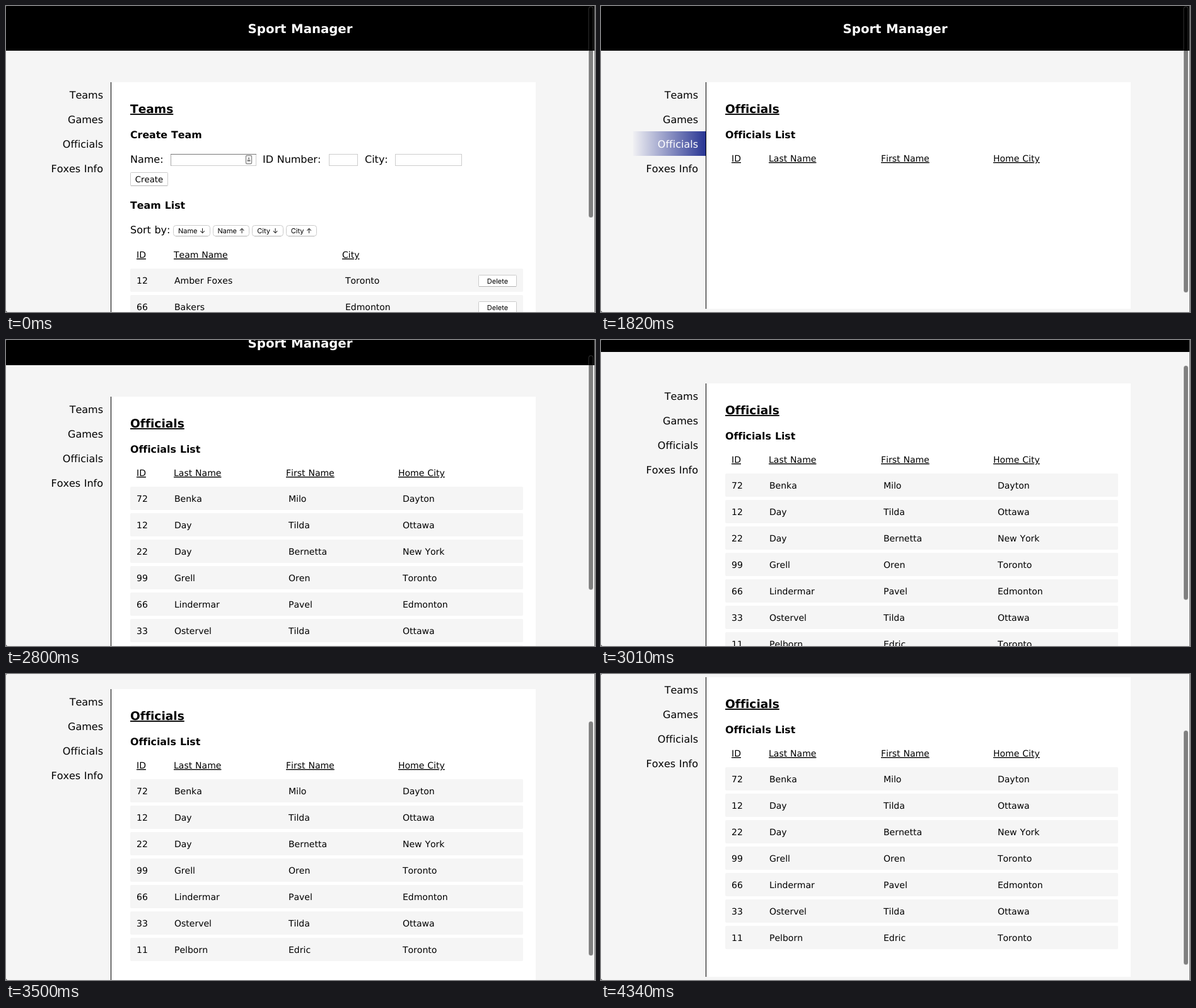
Recreate the animation shown at these times as an HTML page. Size 934 px wide and 486 px high, loop 4410 ms.

```html
<!DOCTYPE html>
<html lang="en">
<head>
<meta charset="utf-8">
<title>Sport Manager</title>
<style>
  html, body { margin: 0; width: 100%; height: 100%; overflow: hidden; background: #f5f5f5; }
  svg { display: block; }
  text {
    font: 16px "DejaVu Sans", Verdana, sans-serif;
    font-kerning: none;
    font-variant-ligatures: none;
    word-spacing: .034em;
    white-space: pre;
    text-rendering: geometricPrecision;
  }
  .title { font-size: 19.7px; font-weight: bold; fill: #fff; text-anchor: middle; }
  .nav { text-anchor: end; }
  .h1 { font-size: 18.6px; font-weight: bold; }
  .h2 { font-size: 15.8px; font-weight: bold; }
  .cell, .head { font-size: 14px; }
  .h1, .head { text-decoration: underline; text-decoration-skip-ink: none; }
  .submit { font-size: 13.3px; text-anchor: middle; }
  .small { font: 11px Inter, Roboto, sans-serif; text-anchor: middle; }
</style>
</head>
<body>
<svg id="stage" width="934" height="486" viewBox="0 0 934 486">
  <defs>
    <linearGradient id="glow">
      <stop offset="0" stop-color="#f0f0f3"/>
      <stop offset="1" stop-color="#283593"/>
    </linearGradient>
  </defs>
</svg>
<script>
const LOOP = 4410, STEP = 70;
const GREY = '#f5f5f5';
const stage = document.getElementById('stage');

function add(parent, tag, attrs) {
  const el = document.createElementNS('http://www.w3.org/2000/svg', tag);
  for (const key in attrs) el.setAttribute(key, attrs[key]);
  parent.appendChild(el);
  return el;
}
const group = parent => add(parent, 'g', {});
const box = (parent, x, y, width, height, fill, extra) =>
  add(parent, 'rect', { x, y, width, height, fill, ...extra });
function label(parent, str, x, y, cls = '') {
  const el = add(parent, 'text', { x, y, class: cls });
  el.textContent = str;
  return el;
}
const outline = (parent, x, y, w, h, stroke, rx = 0) =>
  box(parent, x + .5, y + .5, w - 1, h - 1, '#fff', { stroke, rx });

function button(parent, str, x, y, w, h, rx, cls, base) {
  outline(parent, x, y, w, h, '#cbcbcb', rx);
  box(parent, x + rx, y + h - 1, w - 2 * rx, 1, '#b4b4b4');
  label(parent, str, x + w / 2, base, cls);
}
function heads(parent, names, xs, y) {
  names.forEach((name, i) => label(parent, name, xs[i], y, 'head'));
}
function row(parent, cells, xs, y) {
  box(parent, 197, y, 623, 37, GREY, { rx: 2 });
  cells.forEach((cell, i) => label(parent, cell, xs[i], y + 24, 'cell'));
}

// Page shell
box(stage, 0, 0, 934, 486, GREY);
const page = group(stage);
box(page, 0, 0, 934, 71, '#000');
label(page, 'Sport Manager', 466.5, 43, 'title');
const panel = box(page, 167, 121, 673, 600, '#fff');
const rule = box(page, 166, 121, 1, 600, '#000');

// Side menu
const glow = box(page, 51, 160, 115, 39, 'url(#glow)');
const menu = ['Teams', 'Games', 'Officials', 'Foxes Info'].map((name, i) =>
  label(page, name, 154, 147 + 39 * i, 'nav'));

// Teams view
const teams = group(page);
label(teams, 'Teams', 197, 170, 'h1');
label(teams, 'Create Team', 197, 210, 'h2');
label(teams, 'Name:', 197, 249);
label(teams, 'ID Number:', 407, 249);
label(teams, 'City:', 569, 249);
[[261, 136], [512, 46], [617, 106]].forEach(([x, w]) =>
  outline(teams, x, 235, w, 19, '#cdcdcd'));
box(teams, 261, 235, 136, 1, '#777');
box(teams, 261, 236, 1, 18, '#a5a5a5');
box(teams, 380.5, 237.5, 9, 13, '#fff', { rx: 1.5, stroke: '#8c8c8c', 'stroke-width': 1.4 });
add(teams, 'circle', { cx: 385, cy: 242, r: 1.4, fill: '#8c8c8c' });
box(teams, 382.5, 244, 5, 3, '#8c8c8c', { rx: 1 });
button(teams, 'Create', 197, 264, 60, 22, 1, 'submit', 280);
label(teams, 'Team List', 197, 322, 'h2');
label(teams, 'Sort by:', 197, 361);
[['Name ↓', 265, 59], ['Name ↑', 328, 58], ['City ↓', 390, 50], ['City ↑', 444, 49]]
  .forEach(([str, x, w]) => button(teams, str, x, 348, w, 18, 4, 'small', 361));
heads(teams, ['ID', 'Team Name', 'City'], [207, 266, 533], 400);
[['12', 'Amber Foxes', 'Toronto'], ['66', 'Bakers', 'Edmonton']].forEach((cells, i) => {
  const y = 417 + 42 * i;
  row(teams, cells, [207, 267, 538], y);
  button(teams, 'Delete', 749, y + 10, 61, 19, 1, 'small', y + 24);
});

// Officials view
const officials = group(page);
label(officials, 'Officials', 197, 170, 'h1');
label(officials, 'Officials List', 197, 210, 'h2');
heads(officials, ['ID', 'Last Name', 'First Name', 'Home City'], [207, 266, 444, 622], 247);
const list = group(officials);
[
  ['72', 'Benka', 'Milo', 'Dayton'],
  ['12', 'Day', 'Tilda', 'Ottawa'],
  ['22', 'Day', 'Bernetta', 'New York'],
  ['99', 'Grell', 'Oren', 'Toronto'],
  ['66', 'Lindermar', 'Pavel', 'Edmonton'],
  ['33', 'Ostervel', 'Tilda', 'Ottawa'],
  ['11', 'Pelborn', 'Edric', 'Toronto']
].forEach((cells, i) => row(list, cells, [207, 267, 448, 629], 264 + 42 * i));

// Scrollbar and window edge
const thumb = box(stage, 924, 1, 7, 335, '#000', {
  rx: 3.5, 'fill-opacity': .48, stroke: '#fff', 'stroke-opacity': .2
});
box(stage, 933, 0, 1, 486, '#777');
add(stage, 'path', { d: 'M0 483V486H3Q0 486 0 483M0 0H2Q0 0 0 2', fill: '#333' });

const SCROLL = [[2520, 0], [2800, 31], [3290, 81], [3710, 113], [3850, 116]];
function scrollAt(t) {
  if (t <= SCROLL[0][0]) return 0;
  for (let i = 1; i < SCROLL.length; i++) {
    const [t0, y0] = SCROLL[i - 1], [t1, y1] = SCROLL[i];
    if (t <= t1) return Math.round(y0 + (y1 - y0) * (t - t0) / (t1 - t0));
  }
  return 116;
}
function hoverAt(t) {
  if (t >= 910 && t < 1050) return 1;
  if (t >= 1050 && t < 2240) return 2;
  return -1;
}
const show = (el, on) => el.setAttribute('visibility', on ? 'inherit' : 'hidden');

function draw(time) {
  const t = Math.floor((time % LOOP) / STEP) * STEP;
  const onTeams = t < 1750, loaded = t >= 1890;
  const hover = hoverAt(t), scroll = scrollAt(t);
  const bottom = onTeams ? 667 : loaded ? 597 : 481;
  const size = onTeams ? 335 : loaded ? 372 : 454;

  show(teams, onTeams);
  show(officials, !onTeams);
  show(list, loaded);
  show(glow, hover >= 0);
  glow.setAttribute('y', 121 + 39 * hover);
  menu.forEach((el, i) => el.setAttribute('fill', i === hover ? '#fff' : '#000'));
  panel.setAttribute('height', bottom - 121);
  rule.setAttribute('height', bottom - 121);
  page.setAttribute('transform', `translate(0 ${-scroll})`);
  thumb.setAttribute('y', 1 + scroll * .765);
  thumb.setAttribute('height', size);
}

let start;
function tick(now) {
  start ??= now;
  draw(now - start);
  requestAnimationFrame(tick);
}
draw(0);
requestAnimationFrame(tick);
</script>
</body>
</html>
```
